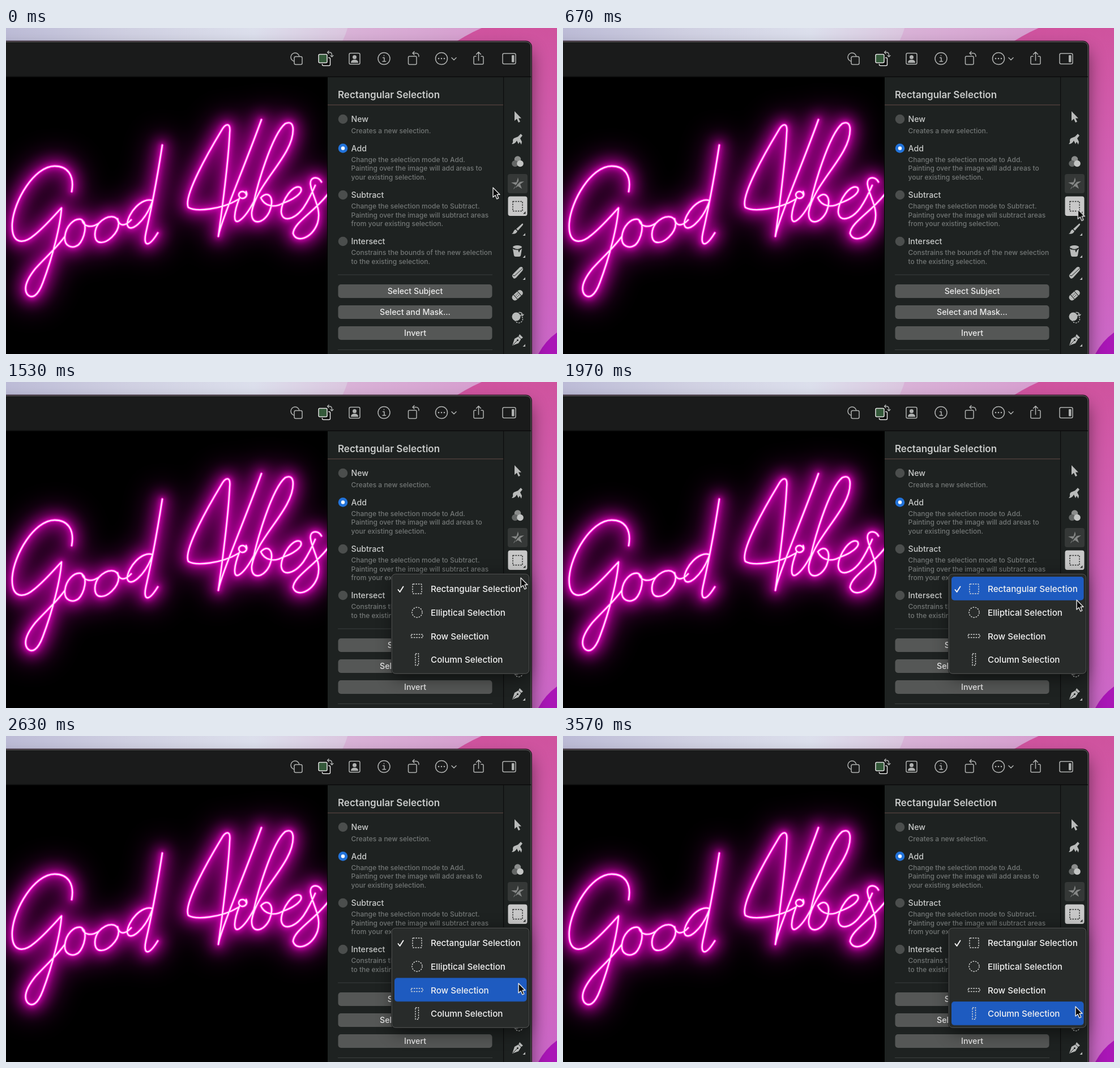
Write an HTML page that moves like this. It is 973 px wide and 576 px high and loops after 4030 ms.

```html
<!DOCTYPE html>
<html lang="en">
<head>
<meta charset="utf-8">
<title>Selection tool menu</title>
<style>
html, body { margin: 0; width: 100%; height: 100%; overflow: hidden; background: #1e2121; }
svg { display: block; width: 973px; height: 576px; }
text { font: 500 14.2px Inter, "Open Sans", sans-serif; fill: #c9cbca; }
.title { font-size: 17px; font-weight: 600; }
.note text { font-size: 12px; fill: #737776; }
.buttons rect { fill: #555756; }
.buttons text { fill: #ececec; text-anchor: middle; }
.line { fill: none; stroke: #b0b2b1; stroke-width: 1.5; stroke-linecap: round; stroke-linejoin: round; }
.tools { fill: #b9bbba; }
.neon { fill: none; stroke-linecap: round; stroke-linejoin: round; }
.dash { fill: none; stroke: #d8d9d8; stroke-width: 1.4; stroke-dasharray: 2.6 1.8; }
#menu text { font-size: 15.2px; fill: #f1f1f1; }

#menu, #mark, #cursor { animation: 4030ms infinite; }
#menu { animation-name: open; animation-timing-function: step-end; }
#mark { animation-name: pick; animation-timing-function: step-end; }
#cursor { animation-name: move; animation-timing-function: linear; }

@keyframes open {
  0% { visibility: hidden; }
  18.1%, 100% { visibility: visible; }
}
@keyframes pick {
  0% { opacity: 0; transform: none; }
  38.7% { opacity: 1; transform: none; }
  49.9% { opacity: 1; transform: translateY(41.7px); }
  62.4% { opacity: 1; transform: translateY(83.4px); }
  73.2%, 100% { opacity: 1; transform: translateY(125.2px); }
}
@keyframes move {
  0% { transform: translate(860px, 282px); animation-timing-function: cubic-bezier(.4, 0, .8, .8); }
  9.93% { transform: translate(894px, 311px); animation-timing-function: ease-out; }
  17.4% { transform: translate(909.5px, 320.5px); }
  21.6% { transform: translate(910px, 321px); }
  30% { transform: translate(910px, 322px); animation-timing-function: cubic-bezier(.4, 0, .8, .8); }
  38% { transform: translate(909px, 346px); }
  48.9% { transform: translate(907px, 385px); }
  65.3% { transform: translate(905px, 437px); animation-timing-function: cubic-bezier(.3, .3, .7, 1); }
  75.2%, 100% { transform: translate(905px, 478px); }
}
</style>
</head>
<body>
<svg viewBox="0 0 973 576">
<defs>
  <linearGradient id="sky">
    <stop offset="0" stop-color="#bcbbd6"/><stop offset=".22" stop-color="#cfcfe1"/>
    <stop offset=".45" stop-color="#dcdfec"/><stop offset=".62" stop-color="#dbc6df"/>
  </linearGradient>
  <linearGradient id="lilac">
    <stop offset="0" stop-color="#d9b5d8"/><stop offset="1" stop-color="#d592ca"/>
  </linearGradient>
  <linearGradient id="pink" x2="0" y2="1">
    <stop offset="0" stop-color="#cf539e"/><stop offset=".45" stop-color="#d160b4"/>
    <stop offset="1" stop-color="#cb68c8"/>
  </linearGradient>
  <filter id="shade" x="-20%" y="-20%" width="140%" height="140%"><feGaussianBlur stdDeviation="15"/></filter>
  <filter id="haze" filterUnits="userSpaceOnUse" x="-120" y="20" width="820" height="580"><feGaussianBlur stdDeviation="24"/></filter>
  <filter id="halo" filterUnits="userSpaceOnUse" x="-80" y="60" width="760" height="520"><feGaussianBlur stdDeviation="11"/></filter>
  <filter id="glow" filterUnits="userSpaceOnUse" x="-80" y="60" width="760" height="520"><feGaussianBlur stdDeviation="4.5"/></filter>
  <clipPath id="photo"><path d="M0 87H567V576H0Z"/></clipPath>
  <path id="words" d="M116 289C121 262 110 244 86 244C50 244 14 305 11 345C9 382 30 383 50 366C70 350 88 328 98 318
    C96 350 82 405 65 450C56 474 46 479 38 471C29 459 40 440 52 425C70 405 90 388 104 368
    C106 350 120 336 132 338C146 344 138 374 128 383C117 391 102 386 104 368
    M134 339C138 353 152 353 164 345C156 355 154 373 163 378C178 383 199 362 199 345C197 329 178 330 164 345
    M197 337C200 352 211 350 221 339M259 305C240 298 215 327 214 347C218 365 246 342 259 305
    M276 207C267 265 257 318 247 362C242 385 251 390 268 362
    M410 303C380 321 335 325 322 317C312 298 360 215 380 182C388 167 397 167 395 185C393 230 383 310 375 368
    C378 345 425 235 451 162M412 301C403 324 400 346 411 341C422 335 432 318 440 302
    M424 294A6.5 6 0 1 0 418 301C424 300 427 295 424 289
    M434 325C442 280 470 188 493 169C512 160 510 190 496 216C478 250 440 288 434 325C432 350 455 346 465 325
    C476 298 462 286 450 300C457 316 475 318 490 309C510 302 526 290 520 282C508 274 486 305 486 325
    C488 345 510 338 525 318C535 303 541 290 546 278M557 272C552 261 535 262 538 278C542 300 558 320 550 345
    C540 373 512 380 507 363C508 344 542 327 568 294"/>
  <path id="corner" d="M0 0V-4.5L-4.5 0Z"/>
</defs>

<!-- desktop -->
<path fill="url(#sky)" d="M0 0H973V576H0Z"/>
<path fill="url(#lilac)" d="M603 0H973V60H570Q597 25 603 0Z"/>
<path fill="url(#pink)" d="M840 0H973V576H780V34Q812 12 840 0Z"/>
<path fill="#a916b6" d="M973 538Q953 552 940 576H973Z"/>
<rect x="-40" y="40" width="968" height="600" rx="12" filter="url(#shade)" opacity=".5"/>

<!-- window -->
<rect x="-20" y="23.5" width="948" height="600" rx="10" fill="#1e2221" stroke="#2b1a25" stroke-width="2"/>
<path fill="#1a1b1b" d="M0 24.5H918Q927 25 927 34V86H0Z"/>
<path fill="none" stroke="#646465" d="M0 24.5H918Q927 25 927 34V576"/>
<path fill="#0b0c0c" d="M0 85.5H927V87H0ZM878 87H879.2V576H878Z"/>
<path d="M0 87H568V576H0Z"/>
<g class="neon" clip-path="url(#photo)">
  <use href="#words" stroke="#9c0086" stroke-width="40" opacity=".5" filter="url(#haze)"/>
  <use href="#words" stroke="#a80092" stroke-width="24" opacity=".78" filter="url(#halo)"/>
  <use href="#words" stroke="#d400b4" stroke-width="9" opacity=".85" filter="url(#glow)"/>
  <use href="#words" stroke="#fb10d2" stroke-width="4.8"/>
  <use href="#words" stroke="#ffe3fb" stroke-width="2.4"/>
</g>

<!-- title bar icons -->
<g class="line" transform="translate(0 -.5)">
  <circle cx="510.5" cy="52" r="7.5"/>
  <rect x="509" y="51" width="14" height="14" rx="2.5" fill="#1a1b1b"/>
  <rect x="558.5" y="53" width="14" height="14" rx="2" fill="#080808" stroke="#e4e4e4"/>
  <rect x="552" y="47" width="15" height="15" rx="2" stroke="#111" stroke-width="4"/>
  <rect x="552" y="47" width="15" height="15" rx="2" fill="#34593a" stroke="#e4e4e4"/>
  <path d="M568 43.5H571Q575.5 43.5 575.5 48V51M570 41L567.5 43.5 570 46M573 49L575.5 51.5 578 49" stroke-width="1.3"/>
  <rect x="606" y="45" width="19" height="19.5" rx="2.5"/>
  <path d="M609 62Q609 56.5 615.5 56.5 622 56.5 622 62Z" fill="#b0b2b1" stroke="none"/>
  <circle cx="615.5" cy="52" r="3.5" fill="#b0b2b1" stroke="none"/>
  <circle cx="667.5" cy="54.5" r="10.5"/>
  <path d="M665.5 53H668V59.5M665 59.5H670.5M667.5 49V49.5"/>
  <rect x="710.5" y="50.5" width="14.5" height="14.5" rx="2"/>
  <path d="M718 45H724Q729 45 729 51M721 42L718 45 721 48" stroke-width="1.4"/>
  <circle cx="769" cy="54.5" r="10.5"/>
  <path d="M764 54.5h.01M769 54.5h.01M774 54.5h.01" stroke-width="2.6"/>
  <path d="M787 53L791 57 795 53"/>
  <path d="M830 50.5H828Q826 50.5 826 52.5V62.5Q826 64.5 828 64.5H841Q843 64.5 843 62.5V52.5Q843 50.5 841 50.5H839M834.5 58V43.5M830.5 47L834.5 43 838.5 47"/>
  <rect x="877" y="45.5" width="23" height="18.5" rx="2.5"/>
  <rect x="893" y="48.5" width="4.500" height="12.5" rx="1" fill="#b0b2b1" stroke="none"/>
</g>

<!-- options panel -->
<text class="title" x="586" y="123.5">Rectangular Selection</text>
<path stroke="#56423f" stroke-width="1.3" d="M568 135.8H878"/>
<g fill="#4b4e4d">
  <circle cx="595" cy="161" r="8.3"/>
  <circle cx="595" cy="212.5" r="8.3" fill="#2273da"/>
  <circle cx="595" cy="212.5" r="3.2" fill="#fff"/>
  <circle cx="595" cy="295" r="8.3"/>
  <circle cx="595" cy="377" r="8.3"/>
</g>
<text x="609.5" y="166">New</text>
<text x="609.5" y="217.5">Add</text>
<text x="609.5" y="300">Subtract</text>
<text x="609.5" y="382">Intersect</text>
<g class="note">
  <text x="609.5" y="185.5">Creates a new selection.</text>
  <text x="609.5" y="236.5">Change the selection mode to Add.</text>
  <text x="609.5" y="252">Painting over the image will add areas to</text>
  <text x="609.5" y="267.5">your existing selection.</text>
  <text x="609.5" y="319">Change the selection mode to Subtract.</text>
  <text x="609.5" y="334.5">Painting over the image will subtract areas</text>
  <text x="609.5" y="350">from your existing selection.</text>
  <text x="609.5" y="401">Constrains the bounds of the new selection</text>
  <text x="609.5" y="416.5">to the existing selection.</text>
</g>
<path stroke="#3b3f3e" d="M586 436H859M586 568.5H859"/>
<g class="buttons">
  <rect x="586.5" y="453" width="272" height="24" rx="5"/>
  <rect x="586.5" y="490" width="272" height="24" rx="5"/>
  <rect x="586.5" y="527" width="272" height="24" rx="5"/>
  <text x="722.5" y="470">Select Subject</text>
  <text x="722.5" y="507">Select and Mask...</text>
  <text x="722.5" y="544">Invert</text>
</g>

<!-- tool strip -->
<g class="tools">
  <path d="M898 147V164L902 160.5 905 167 908 165.5 905 159.5H910Z"/>
  <path d="M893 205Q896 202 895 199 895 195 899 194L904 192 909 187 912 190 908 195 911 201 910 206 907 201 905 205 902 199Q899 205 893 205Z"/>
  <circle cx="903.5" cy="232" r="5.8" fill="#8b8d8c"/>
  <circle cx="899" cy="239.5" r="5.8" fill="#646766"/>
  <circle cx="908" cy="239.5" r="5.8" fill="#c2c4c3"/>
  <rect x="886" y="258" width="35" height="34" rx="4" fill="#353837"/>
  <path fill="#858786" d="M904 264L906 272 915 271 908 276 911 284 904 279.5 896 285 899.5 277 892 273 901.5 272.5Z"/>
  <path fill="none" stroke="#353837" stroke-width="1.2" d="M893 285L913 266M897 286L909 264"/>
  <rect x="886.5" y="297.5" width="34" height="34.5" rx="4" fill="#c8c8c8"/>
  <rect x="895" y="306.5" width="17" height="17" class="dash" style="stroke: #2b2d2c"/>
  <use href="#corner" x="917.5" y="328.5" fill="#2b2d2c"/>
  <path d="M912.5 345.5Q914 347 912 349L904 358 901 355 910 347Q911 345 912.5 345.5ZM900 356L903 359Q901 365 893 363.5 896 362 896.5 359 898 356 900 356Z"/>
  <path d="M895 390H911L909 402Q908.5 404 906 404H900Q897.5 404 897 402Z"/>
  <ellipse cx="903" cy="387" rx="8" ry="3"/>
  <path fill="#1e2221" d="M896 389.5Q903 392 910 389.5V391Q907 392 906.5 396 905 397 904.5 392 900 392.5 896 391Z"/>
  <path d="M907 423Q910 421 912 423L913 426Q913 428 911 430L901 441Q898 444 896 442L894 439Q893 437 896 434Z"/>
  <path stroke="#1e2221" d="M895 437L898 438 912 425" fill="none"/>
  <g transform="rotate(-42 903 472)">
    <rect x="892" y="467" width="22" height="10.5" rx="5"/>
    <path stroke="#1e2221" d="M898.5 467V478M907.5 467V478" fill="none"/>
    <path stroke="#1e2221" stroke-width="1.4" stroke-linecap="round" d="M901.5 470.5h.01M904.5 470.5h.01M901.5 474h.01M904.5 474h.01"/>
  </g>
  <circle cx="901" cy="510" r="7.5"/>
  <circle cx="905.5" cy="514" r="7" class="dash" style="stroke: #b9bbba"/>
  <path class="line" stroke-width="1.2" d="M906 502.5Q912 502 912 508M910 506L912 508.5 914 506"/>
  <path d="M907 541L913 547 910 549 905 557 894 561 898 549 905 545Z"/>
  <path stroke="#1e2221" fill="none" d="M895 560L903 552M904.5 544.5L910 550"/>
  <circle cx="903.5" cy="551.5" r="1.5" fill="#1e2221"/>
  <use href="#corner" x="917" y="367"/>
  <use href="#corner" x="917" y="406"/>
  <use href="#corner" x="917" y="445"/>
  <use href="#corner" x="917" y="563"/>
</g>

<!-- tool menu -->
<g id="menu">
  <rect x="684" y="345" width="238" height="178" rx="7" filter="url(#shade)" opacity=".5"/>
  <rect x="680.5" y="338.5" width="244" height="177.5" rx="7" fill="#282b2a" stroke="#111"/>
  <rect x="681.2" y="339.2" width="242.6" height="176" rx="6.5" fill="none" stroke="#565958"/>
  <rect id="mark" x="686" y="344" width="233.5" height="41.7" rx="5" fill="#1e5bc0"/>
  <path fill="none" stroke="#f3f3f3" stroke-width="2" stroke-linecap="round" stroke-linejoin="round" d="M692.5 367L695.5 371 701.5 361.5"/>
  <g class="dash">
    <rect x="718" y="357" width="16" height="17" rx="1"/>
    <circle cx="726" cy="407" r="9"/>
    <rect x="715.5" y="446" width="20.5" height="5.5"/>
    <rect x="723" y="480" width="5.5" height="20.5"/>
  </g>
  <text x="750" y="371.3">Rectangular Selection</text>
  <text x="750" y="413">Elliptical Selection</text>
  <text x="750" y="454.7">Row Selection</text>
  <text x="750" y="496.3">Column Selection</text>
</g>

<path id="cursor" fill="#080808" stroke="#e6e6e6" stroke-width="1.4" stroke-linejoin="round" d="M0 0V17L4 13.5 6.8 20 9.8 18.7 7 12.3H12Z"/>
</svg>
</body>
</html>
```
